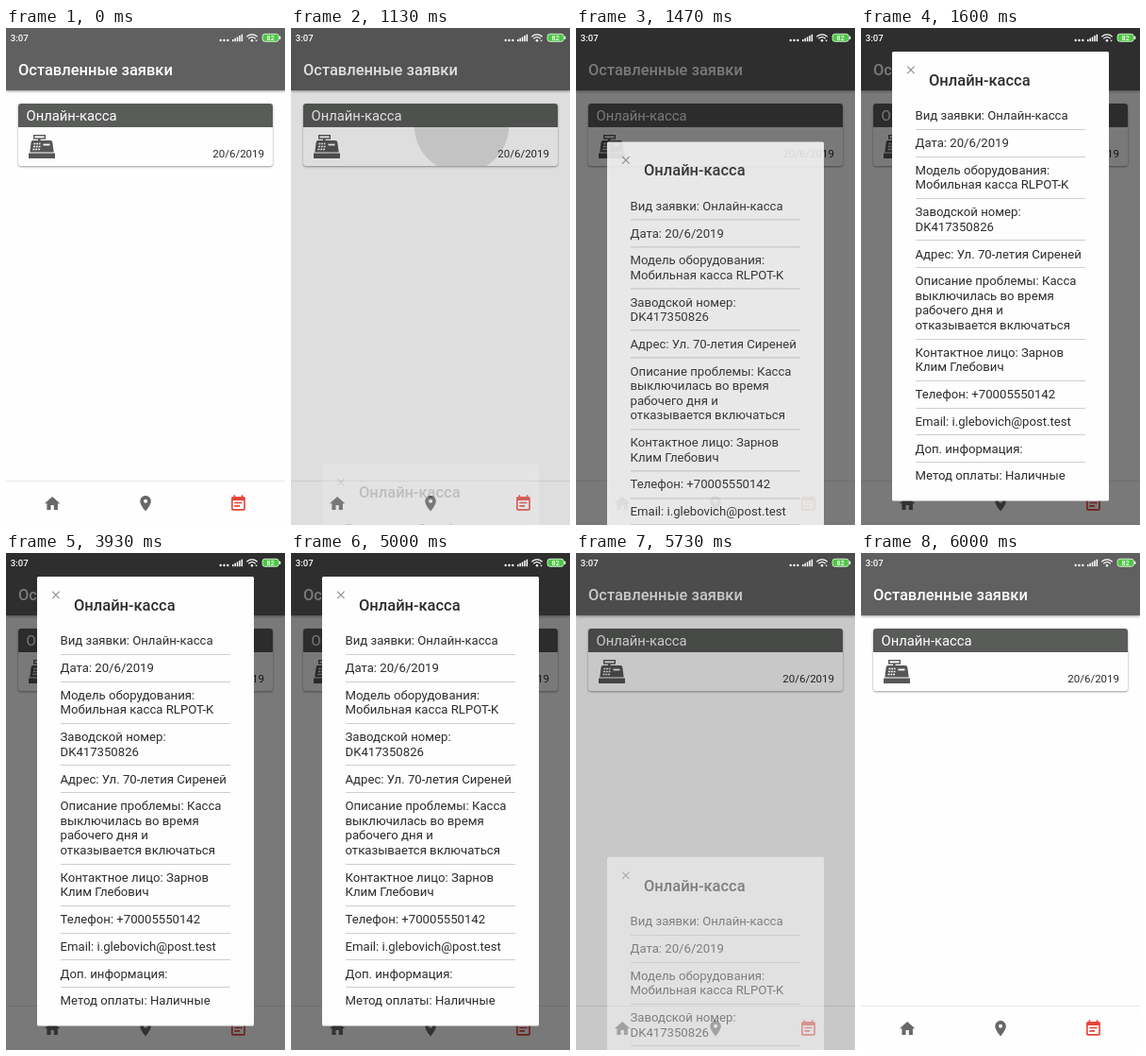
An HTML page that plays this animation: 296 by 526 pixels, repeating every 6340 ms.

```html
<!DOCTYPE html>
<html lang="ru">
<head>
<meta charset="utf-8">
<style>
  html, body { margin: 0; width: 100%; height: 100%; overflow: hidden; background: #fdfefd; }
  svg { display: block; width: 296px; height: 526px; }
  text { font-family: Roboto, "Noto Sans", sans-serif; white-space: pre; }
  .bold { font-weight: 500; }
  .bar { filter: drop-shadow(0 1px 1.5px rgba(0, 0, 0, .4)); }
  .card { filter: drop-shadow(0 1px 1px rgba(0, 0, 0, .4)); }
</style>
</head>
<body>
<svg viewBox="0 0 296 526">
  <clipPath id="cardBody"><path d="M13 105h270v38q0 3-3 3H16q-3 0-3-3z"/></clipPath>

  <rect width="296" height="526" fill="#fdfefd"/>
  <rect class="bar" width="296" height="66" fill="#5f605f"/>
  <text class="bold" x="13" y="49.7" font-size="16.44" fill="#fff">Оставленные заявки</text>

  <rect class="card" x="13" y="80" width="270" height="66" rx="3" fill="#fdfefd"/>
  <g clip-path="url(#cardBody)"><circle id="cardRipple" cx="181" cy="103"/></g>
  <path d="M13 105V83q0-3 3-3h264q3 0 3 3v22z" fill="#5a5c5a"/>
  <text x="21.5" y="98" font-size="14.8" fill="#fff">Онлайн-касса</text>
  <text x="274" y="137.2" font-size="11.5" text-anchor="end" fill="#2a2a2a">20/6/2019</text>

  <!-- cash register -->
  <g fill="#555655">
    <path d="M24 132.5h28v5.5H24zM28.500 119H47q2 0 2.300 2l1.400 10.500H25.300L26.600 121q.3-2 1.900-2z"/>
    <path d="M34 117h2.500v3H34z"/>
    <rect x="29.700" y="113.700" width="11.600" height="3.300" fill="none" stroke="#555655" stroke-width="1.400"/>
    <path d="M39.500 123.500h7" stroke="#fdfefd" stroke-width="1.800"/>
    <path d="M29.500 122.500h7M29 125.500h7.500M28.500 128.500h8" stroke="#fdfefd" stroke-width="1.500" stroke-dasharray="1.900 .9"/>
  </g>

  <!-- bottom navigation -->
  <path d="M0 479.500h296" stroke="#e6e7e6"/>
  <g fill="#676867">
    <path transform="translate(39.300 493.500) scale(.822)" d="M10 20v-6h4v6h5v-8h3L12 3 2 12h3v8z"/>
    <path transform="translate(138.200 493.300) scale(.822)" d="M12 2C8.130 2 5 5.130 5 9c0 5.250 7 13 7 13s7-7.750 7-13c0-3.870-3.130-7-7-7zm0 9.500a2.500 2.500 0 1 1 0-5 2.500 2.500 0 0 1 0 5z"/>
    <path transform="translate(236.600 493.500) scale(.822)" fill="#e8433a" fill-rule="evenodd" d="M19 3h-1V1h-2v2H8V1H6v2H5c-1.100 0-2 .9-2 2v14c0 1.100.9 2 2 2h14c1.100 0 2-.9 2-2V5c0-1.100-.9-2-2-2zm0 16H5V8h14zM7 10h10v2H7zM7 14h7v2H7z"/>
  </g>

  <rect id="dim" width="296" height="526"/>

  <g id="dialog" fill="#2b2c2b">
    <rect x="33" y="25" width="230" height="475.500" rx="1.500" fill="#fdfefd"/>
    <circle id="closeRipple" cx="57" cy="45.500" fill="#000"/>
    <path d="M49.200 40.700l7.400 7.400m0-7.400l-7.400 7.400" stroke="#8b8c8b" stroke-width="1.100"/>
    <text class="bold" x="72" y="60.900" font-size="16.44">Онлайн-касса</text>
    <g id="rows" font-size="13.16"></g>
  </g>

  <!-- status bar -->
  <g fill="#fff">
    <text class="bold" x="4.800" y="14.300" font-size="9.600">3:07</text>
    <circle cx="227.700" cy="13" r="1.200"/><circle cx="231.500" cy="13" r="1.200"/><circle cx="235.300" cy="13" r="1.200"/>
    <path d="M240 12h1.500v2.200H240zM242.400 10.700h1.500v3.500h-1.500zM244.800 9.400h1.500v4.800h-1.500zM247.200 8.100h1.500v6.100h-1.500zM249.600 6.800h1.500v7.400h-1.500z"/>
    <g fill="none" stroke="#fff" stroke-width="1.200">
      <path d="M255.300 9.200q5.700-4.600 11.400 0M257.200 11.200q3.800-3 7.600 0"/>
    </g>
    <circle cx="261" cy="13.300" r="1.300"/>
    <path id="traffic" d="M264.300 12.700h2.600l-1.300 1.900z"/>
    <rect x="272.100" y="6.300" width="17.200" height="8" rx="2.500" fill="#49c83f" stroke="#e6f5e4" stroke-width=".9"/>
    <rect x="290" y="8.600" width="1.300" height="3.400" rx=".6"/>
    <text class="bold" x="280.700" y="12.900" font-size="7.200" text-anchor="middle">82</text>
  </g>
</svg>
<script>
const LOOP = 6340, STEP = 200 / 3, TRAVEL = 501, SLIDE = 490;
const OPEN = 1070, CLOSE = 5443;
const $ = id => document.getElementById(id);
const clamp = v => Math.max(0, Math.min(1, v));

const rows = [
  ['Вид заявки: Онлайн-касса'],
  ['Дата: 20/6/2019'],
  ['Модель оборудования:', 'Мобильная касса RLPOT-K'],
  ['Заводской номер:', 'DK417350826'],
  ['Адрес: Ул. 70-летия Сиреней'],
  ['Описание проблемы: Касса', 'выключилась во время', 'рабочего дня и', 'отказывается включаться'],
  ['Контактное лицо: Зарнов', 'Клим Глебович'],
  ['Телефон: +70005550142'],
  ['Email: i.glebovich@post.test'],
  ['Доп. информация:'],
  ['Метод оплаты: Наличные']
];

let y = 97.3, markup = '';
rows.forEach((lines, i) => {
  for (const line of lines) {
    markup += `<text x="57.500" y="${y}">${line}</text>`;
    y += 15.5;
  }
  if (i < rows.length - 1) markup += `<path d="M58 ${Math.round(y - 5.8) + .5}h180" stroke="#cdcecd"/>`;
  y += 13.3;
});
$('rows').innerHTML = markup;

function ripple(id, t, start, r, grow, fadeAt) {
  const c = $(id);
  c.setAttribute('r', Math.max(0, r * grow(t - start)));
  c.setAttribute('opacity', t < start ? 0 : .12 * clamp(1 - (t - fadeAt) / 200));
}

function draw(now) {
  const t = Math.floor((now % LOOP + 4) / STEP) * STEP;
  const closing = clamp((t - CLOSE) / SLIDE);
  const shown = clamp((t - OPEN) / SLIDE) - closing;

  $('dialog').setAttribute('transform', `translate(0 ${(1 - shown) * TRAVEL})`);
  $('dialog').setAttribute('opacity', Math.max(0, shown) ** .85);
  $('dim').setAttribute('opacity', .52 * (clamp((t - 1050) / 350) - closing));

  ripple('cardRipple', t, 999, 50, d => (d + 67) / 200, 1133);
  ripple('closeRipple', t, 5332, 25, d => Math.min(1, .4 + d / 330), 5533);
  $('traffic').setAttribute('opacity', t < 5999 ? 1 : 0);
  requestAnimationFrame(tick);
}

const began = performance.now();
function tick() { draw(performance.now() - began); }
tick();
</script>
</body>
</html>
```
